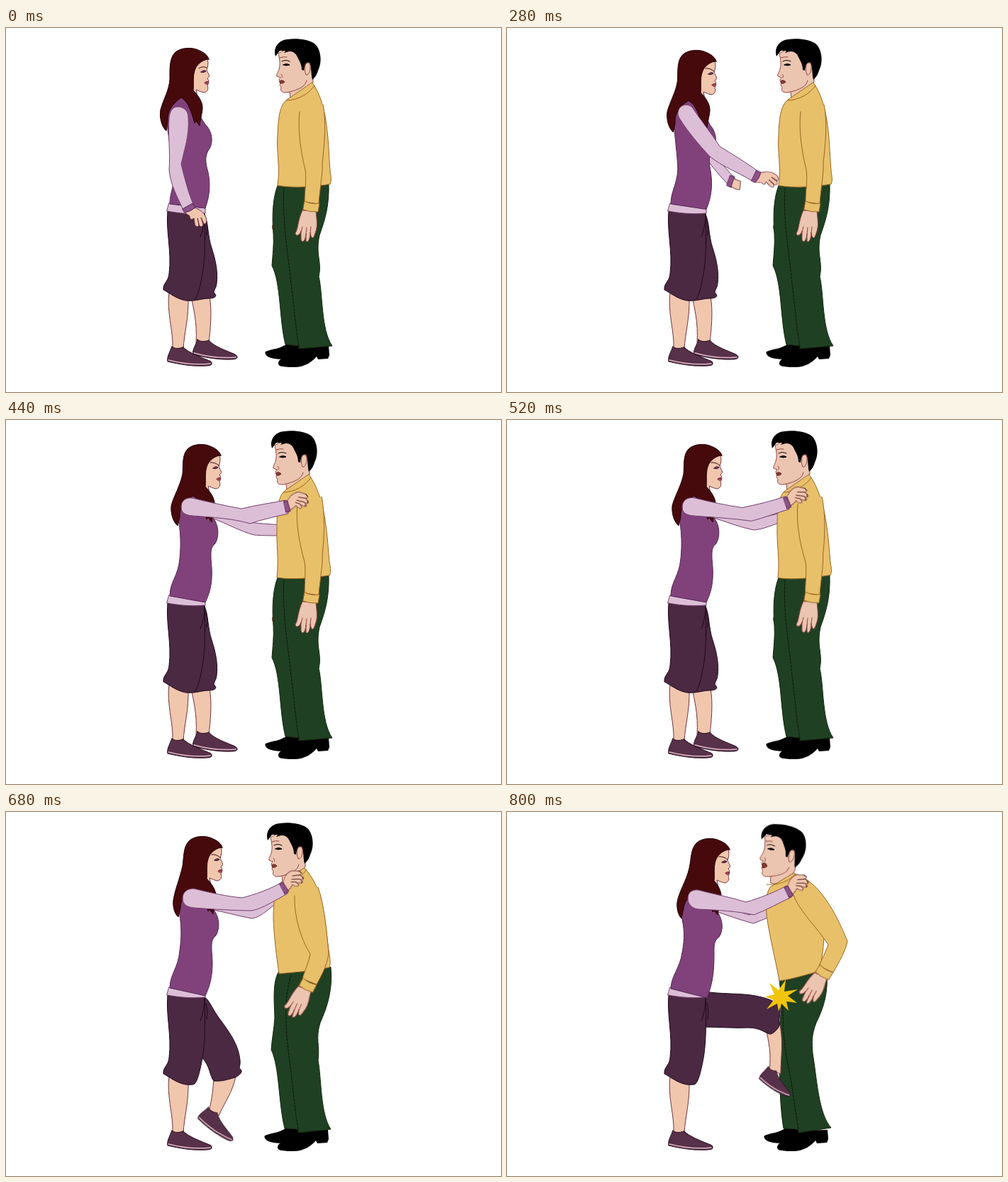
Animation of 698 by 513 pixels, one loop 1200 ms. Source, as an HTML page without scripts:

```html
<!DOCTYPE html>
<html lang="en">
<head>
<meta charset="utf-8">
<title>Knee strike</title>
<style>
html, body { margin: 0; width: 100%; height: 100%; overflow: hidden; background: #fff; }
svg { display: block; width: 698px; height: 513px; }
path { stroke-width: 1; stroke-linejoin: round; stroke-linecap: round; }

.skin { fill: #f0c6ad; stroke: #6e3440; }
.sleeve { fill: #dcbfd7; stroke: #74406c; }
.top { fill: #81427c; stroke: #552352; }
.cuff { fill: #8d5288; stroke: #552352; }
.shorts { fill: #4b2942; stroke: #1e0a1a; }
.hair { fill: #460a0c; stroke: #240204; }
.shoe { fill: #573049; stroke: #2a1222; }
.sole { fill: none; stroke: #dcb4c4; stroke-width: 1.5; }
.man-skin { fill: #ecc5b1; stroke: #8e4640; }
.shirt { fill: #e8c069; stroke: #9a6424; }
.pants { fill: #204023; stroke: #14280f; }
.black { fill: #000; }
.line { fill: none; }

/* One drawing step every 40 ms; each segment sets its own count. */
.k { animation: 1.2s steps(2) infinite; }
#w-head { animation-name: w-head; }
#hair { animation-name: hair; }
#brow { animation-name: brow; }
#torso { animation-name: torso; }
#arm { animation-name: arm; }
#hand-down { animation-name: hand-down; }
#hand-grip { animation-name: hand-grip; }
#far-arm { animation-name: far-arm; }
#far-hand { animation-name: far-hand; }
#thigh { animation-name: thigh; }
#shin { animation-name: shin; }
#foot { animation-name: foot; }
.m-head { animation-name: m-head; transform-origin: 408px 80px; }
#mouth { animation-name: mouth; transform-box: fill-box; transform-origin: center; }
#shirt { animation-name: shirt; }
#m-arm { animation-name: m-arm; }
#m-hand { animation-name: m-hand; }
#pants { animation-name: pants; }
#crease { animation-name: crease; }
#m-shoes { animation-name: m-shoes; }
#m-far { animation-name: m-far; }
#star { animation-name: star; }

@keyframes w-head {
  0% { transform: translate(0, 0); animation-timing-function: steps(5); }
  16.66% { transform: translate(1px, 0); animation-timing-function: steps(4); }
  30%, 50% { transform: translate(17px, 6px); }
  56.66% { transform: translate(19px, 6px); animation-timing-function: steps(3); }
  66.66%, to { transform: translate(28px, 9px); }
}
@keyframes hair {
  0%, 16.66% { d: path("M286 44 C279 44 269 50 266 60 C263 70 265 80 264 88 C270 94 278 104 277 114 C276 124 274 128 273 138 L268 131 L266 134 C263 124 258 104 247 98 C236 106 227 116 228 131 L226 145 C219 139 216 125 218 115 C222 100 230 88 231 72 C231 60 230 43 238 35 C246 27 263 27 271 31 C279 34 285 39 286 44 Z"); animation-timing-function: steps(4); }
  30%, 50% { d: path("M286 44 C279 44 269 50 266 60 C263 70 265 80 264 88 C270 94 278 104 277 114 C276 124 274 128 273 138 L268 131 L266 134 C263 124 258 106 247 101 C236 106 227 116 228 131 L225 143 C218 137 215 125 216 115 C219 102 229 86 232 70 C233 58 231 43 239 35 C247 27 263 27 271 31 C279 34 285 39 286 44 Z"); }
  56.66% { d: path("M286 44 C279 44 269 50 266 60 C263 70 265 80 264 88 C270 94 278 104 277 114 C276 124 274 128 273 138 L268 131 L266 134 C263 124 258 108 247 102 C236 106 227 116 227 129 L224 142 C218 137 216 126 217 118 C219 104 226 88 230 70 C232 56 231 43 239 35 C247 27 263 27 271 31 C279 34 285 39 286 44 Z"); animation-timing-function: steps(3); }
  66.66%, to { d: path("M286 44 C279 44 269 50 266 60 C263 70 265 80 264 88 C270 94 275 104 274 112 C273 122 270 126 269 136 L264 130 L262 132 C259 122 256 108 246 104 C234 104 222 114 221 127 L218 141 C213 136 211 126 212 118 C214 104 225 88 229 70 C232 56 231 43 239 35 C247 27 263 27 271 31 C279 34 285 39 286 44 Z"); }
}
@keyframes brow {
  0% { d: path("M272 57 Q277 53 283 56"); animation-timing-function: steps(5); }
  16.66%, to { d: path("M271 54 Q277 53 283 58"); }
}
@keyframes torso {
  0%, 16.66% { d: path("M247 98 C262 104 272 122 281 136 C290 144 293 160 287 170 C281 178 281 186 283 196 C289 215 288 235 281 254 L231 248 C231 228 243 212 236 185 C231 165 227 145 227 125 C229 112 238 102 247 98 Z"); animation-timing-function: steps(4); }
  30%, 50% { d: path("M263 103 C278 108 287 124 292 138 C300 148 301 164 295 174 C288 180 289 186 289 196 C291 215 292 235 281 257 L231 248 C231 228 243 220 245 195 C247 175 246 160 244 145 C238 122 250 106 263 103 Z"); }
  56.66% { d: path("M264 103 C279 108 288 124 293 138 C301 148 302 164 296 174 C289 180 290 186 290 196 C292 215 292 236 281 259 L231 248 C231 229 243 220 245 195 C248 175 247 160 245 145 C240 122 251 106 264 103 Z"); animation-timing-function: steps(3); }
  66.66%, to { d: path("M268 106 C283 112 291 126 296 140 C304 150 306 166 299 176 C291 182 292 190 292 200 C292 220 291 240 282 262 L231 249 C231 232 244 220 247 198 C251 178 250 163 246 147 C246 128 254 112 268 106 Z"); }
}
@keyframes arm {
  0% { d: path("M242 111 C250 111 257 116 257 126 C259 152 251 172 247 192 C252 212 257 232 264 248 L250 257 C242 238 232 222 230 200 C232 175 228 150 230 127 C231 117 235 111 242 111 Z"); animation-timing-function: steps(5); }
  16.66% { d: path("M243 111 C251 111 258 116 258 126 C260 152 254 172 251 192 C257 212 262 232 271 248 L258 257 C248 238 236 222 234 200 C237 175 232 150 231 127 C232 117 236 111 243 111 Z"); }
  23.33% { d: path("M244 112 C250 106 258 108 262 113 C276 134 288 148 300 167 C318 178 338 190 354 202 L345 215 C325 203 303 195 286 181 C271 165 255 146 245 130 C240 124 240 117 244 112 Z"); }
  30% { d: path("M248 124 C248 115 254 111 263 112 C287 120 310 128 326 143 C345 140 368 145 391 147 L391 161 C370 163 350 163 332 164 C310 160 288 142 263 137 C253 136 248 132 248 124 Z"); }
  36.66% { d: path("M247 123 C247 114 253 109 263 110 C287 116 310 121 332 125 C352 120 374 117 395 113 L398 132 C380 136 362 140 344 146 C322 139 290 137 263 135 C253 134 247 131 247 123 Z"); animation-timing-function: steps(4); }
  50% { d: path("M247 123 C247 114 253 109 263 109 C287 115 310 120 332 122 C352 118 374 112 391 102 L398 119 C380 126 362 136 345 139 C322 139 290 137 263 135 C253 134 247 131 247 123 Z"); }
  56.66% { d: path("M249 122 C249 113 255 108 265 108 C289 114 312 119 333 121 C352 116 372 109 389 99 L397 115 C380 124 362 136 347 139 C324 139 292 137 265 135 C255 134 249 130 249 122 Z"); animation-timing-function: steps(3); }
  66.66%, to { d: path("M255 122 C255 113 261 109 270 110 C292 116 316 120 337 127 C357 121 378 113 394 104 L401 120 C384 128 366 138 348 145 C326 140 296 138 270 137 C261 136 255 130 255 122 Z"); }
}
@keyframes hand-down {
  0% { transform: translate(257px, 253px); opacity: 1; animation-timing-function: steps(5); }
  16.66% { transform: translate(264px, 253px); }
  23.33% { transform: translate(350px, 209px) rotate(-35deg); opacity: 1; animation-timing-function: step-end; }
  26.66%, to { transform: translate(371px, 181px) rotate(-50deg); opacity: 0; }
}
@keyframes hand-grip {
  0% { transform: translate(371px, 181px) rotate(15deg); opacity: 0; animation-timing-function: step-end; }
  26.66% { transform: translate(371px, 181px) rotate(15deg); opacity: 1; animation-timing-function: step-end; }
  30% { transform: translate(392px, 154px) rotate(0deg); }
  36.66% { transform: translate(397px, 122px) rotate(-8deg); animation-timing-function: steps(4); }
  50% { transform: translate(395px, 111px) rotate(-22deg); }
  56.66% { transform: translate(393px, 107px) rotate(-24deg); animation-timing-function: steps(3); }
  66.66%, to { transform: translate(398px, 112px) rotate(-22deg); opacity: 1; }
}
@keyframes far-arm {
  0%, 16.66% { d: path("M262 125 C265 145 265 160 265 180 C268 200 270 215 272 235 L260 238 C255 220 252 205 250 185 C250 165 250 145 250 130 Z"); animation-timing-function: steps(4); }
  30% { d: path("M285 140 C297 150 308 160 318 174 C336 184 358 190 378 198 L372 212 C352 204 334 196 315 187 C306 176 300 166 290 158 Z"); }
  36.66% { d: path("M285 136 C300 137 320 140 342 144 C358 146 374 147 392 148 L392 163 C376 163 362 163 350 162 C330 157 312 146 290 138 Z"); animation-timing-function: steps(4); }
  50% { d: path("M285 130 C300 132 320 134 342 134 C358 130 374 122 392 110 L392 122 C376 130 362 146 345 148 C325 145 305 140 290 137 Z"); }
  56.66% { d: path("M286 130 C300 132 320 134 342 136 C358 130 374 122 392 112 L392 122 C376 130 362 148 347 150 C325 146 305 140 291 138 Z"); animation-timing-function: steps(3); }
  66.66%, to { d: path("M287 130 C305 134 322 139 342 145 C358 138 376 130 395 122 L395 138 C380 143 362 152 347 157 C328 152 310 145 294 140 Z"); }
}
@keyframes far-hand {
  0%, 16.66% { transform: translate(258px, 230px) rotate(15deg); animation-timing-function: steps(4); }
  30% { transform: translate(375px, 205px) rotate(15deg); }
  36.66%, to { transform: translate(394px, 155px) rotate(0deg); }
}
@keyframes thigh {
  0%, 50% { d: path("M279 260 C286 275 284 292 290 310 C296 328 299 345 297 360 C297 366 291 372 294 374 C298 377 295 381 288 381 C278 381 270 384 264 384 C268 372 272 355 272 340 Z"); }
  56.66% { d: path("M279 260 C286 264 290 275 298 287 C310 304 328 325 330 350 C331 358 327 361 331 363 C335 366 328 373 320 375 C312 377 305 380 293 379 C287 372 288 358 277 347 Z"); animation-timing-function: steps(3); }
  66.66%, to { d: path("M279 253 C300 257 330 255 350 259 C366 262 378 266 384 273 C387 280 383 290 384 298 C386 302 376 313 371 313 C364 312 358 304 340 304 C320 305 300 303 279 303 Z"); }
}
@keyframes shin {
  0%, 50% { d: path("M261 378 C264 394 270 415 268 444 L286 444 C288 425 291 400 287 378 Z"); }
  56.66% { d: path("M293 374 C292 390 291 402 286 422 L300 428 C310 406 320 394 324 372 Z"); animation-timing-function: steps(3); }
  66.66%, to { d: path("M365 304 C369 325 373 340 370 364 L386 369 C386 345 391 320 383 292 Z"); }
}
@keyframes foot {
  0%, 50% { transform: translate(264px, 459px) rotate(0deg) scale(1, 1); }
  56.66% { transform: translate(271px, 431px) rotate(28deg) scale(.93, 1); animation-timing-function: steps(3); }
  66.66%, to { transform: translate(356px, 375px) rotate(24deg) scale(.8, 1); }
}
@keyframes m-head {
  0%, 30% { transform: translate(0, 0) rotate(0deg); }
  36.66% { transform: translate(-5px, 0) rotate(0deg); animation-timing-function: steps(4); }
  50% { transform: translate(-7px, 0) rotate(0deg); }
  56.66% { transform: translate(-11px, 0) rotate(0deg); animation-timing-function: steps(3); }
  66.66%, to { transform: translate(-27px, 2px) rotate(8deg); }
}
@keyframes mouth {
  0%, 56.66% { transform: scaleY(1); animation-timing-function: steps(3); }
  66.66%, to { transform: scaleY(1.4); }
}
@keyframes shirt {
  0%, 30% { d: path("M399 99 C386 106 384 125 383 150 C381 175 387 195 383 222 C405 226 435 224 457 220 C460 214 457 205 457 200 C454 170 456 110 432 77 Z"); }
  36.66% { d: path("M394 99 C384 106 382 125 382 150 C381 175 385 195 382 222 C405 226 435 222 456 219 C459 214 457 205 456 200 C453 170 452 110 427 77 Z"); animation-timing-function: steps(4); }
  50% { d: path("M391 100 C382 106 380 125 380 150 C379 175 385 195 382 223 C405 226 435 222 456 218 C459 214 456 205 456 200 C453 170 450 110 425 77 Z"); }
  56.66% { d: path("M387 100 C380 106 377 125 377 150 C378 175 381 200 385 228 C405 226 435 224 456 219 C458 214 457 205 455 195 C450 160 450 110 421 79 Z"); animation-timing-function: steps(3); }
  66.66%, to { d: path("M371 106 C364 118 365 128 366 145 C370 175 378 205 384 238 C400 236 420 230 441 224 C444 205 447 190 447 170 C440 150 430 105 405 86 Z"); }
}
@keyframes m-arm {
  0%, 30% { d: path("M414 118 C411 145 416 175 422 200 C424 215 421 230 421 245 L441 248 C442 230 447 205 446 190 C449 165 452 130 447 108"); }
  36.66% { d: path("M411 118 C408 145 414 175 421 200 C423 215 421 230 421 244 L441 247 C442 230 447 205 446 190 C449 165 450 130 445 108"); animation-timing-function: steps(4); }
  50% { d: path("M409 118 C407 145 412 175 421 200 C423 215 420 230 420 244 L441 246 C442 230 446 205 445 190 C448 165 449 130 443 108"); }
  56.66% { d: path("M407 118 C406 145 415 178 429 200 C427 212 421 224 418 235 L438 243 C445 230 452 218 455 200 C453 175 449 130 440 106"); animation-timing-function: steps(3); }
  66.66%, to { d: path("M403 115 C412 140 437 162 453 187 C449 198 444 207 440 217 L460 226 C468 212 478 195 480 182 C470 158 446 100 408 88"); }
}
@keyframes m-hand {
  0%, 30% { transform: translate(431px, 246px) rotate(0deg); }
  36.66% { transform: translate(431px, 245px) rotate(0deg); animation-timing-function: steps(4); }
  50% { transform: translate(431px, 244px) rotate(0deg); }
  56.66% { transform: translate(428px, 239px) rotate(18deg); animation-timing-function: steps(3); }
  66.66%, to { transform: translate(450px, 221px) rotate(22deg); }
}
@keyframes pants {
  0%, 50% { d: path("M383 222 C376 240 375 265 377 290 C378 305 376 320 375 335 C388 360 385 410 394 446 L413 448 L413 452 L460 448 C444 425 447 375 441 350 C446 330 436 320 442 292 C450 270 456 250 455 219 Z"); }
  56.66% { d: path("M384 226 C376 240 378 265 379 290 C378 305 375 320 374 335 C386 360 384 410 393 446 L412 447 L412 452 L458 447 C443 425 445 375 440 350 C443 330 436 320 443 297 C453 275 461 250 458 219 Z"); animation-timing-function: steps(3); }
  66.66%, to { d: path("M384 236 C385 245 387 262 386 285 C384 305 382 330 383 345 C385 370 384 410 390 446 L411 447 L411 452 L457 445 C439 425 437 375 431 340 C430 325 429 315 436 297 C447 275 453 255 451 224 Z"); }
}
@keyframes crease {
  0%, 50% { d: path("M392 226 C389 270 398 320 402 360 C406 390 408 420 413 448"); }
  56.66% { d: path("M402 230 C389 270 396 320 401 360 C405 390 407 420 412 447"); animation-timing-function: steps(3); }
  66.66%, to { d: path("M390 240 C388 270 388 320 397 360 C403 390 406 420 411 447"); }
}
@keyframes m-shoes {
  0%, 50% { transform: translate(0, 0); }
  56.66% { transform: translate(-1px, 0); animation-timing-function: steps(3); }
  66.66%, to { transform: translate(-3px, 0); }
}
@keyframes m-far {
  0%, 50% { transform: translate(0, 0); }
  56.66%, to { transform: translate(14px, 0); }
}
@keyframes star {
  0% { opacity: 0; animation-timing-function: step-end; }
  66.66%, to { opacity: 1; }
}
</style>
</head>
<body>
<svg viewBox="0 0 698 513">
  <defs>
    <g id="shoe">
      <path class="shoe" d="M6 -20 C11 -16 17 -17 22 -19 C29 -10 48 -4 59 1 C64 4 63 8 55 8 C35 9 15 5 0 1 C-2 -6 4 -12 6 -20 Z"/>
      <path class="sole" d="M1 -1 C15 3 38 7 60 5"/>
    </g>
  </defs>

  <path id="far-arm" class="k sleeve"/>
  <g id="far-hand" class="k">
    <path class="skin" d="M-3 -6 C3 -7 8 -4 12 -5 L14 7 C8 9 2 6 -4 4 Z"/>
    <path class="cuff" d="M-4 -9 L2 -9 L1 7 L-5 6 Z"/>
  </g>

  <g id="man">
    <g id="m-shoes" class="k">
      <path class="black" d="M366 456 C376 452 388 452 396 445 L418 448 L400 462 C392 469 376 467 369 463 Q364 459 366 456 Z"/>
      <path class="black" d="M384 473 C384 464 404 458 413 449 L455 448 L456 461 L454 466 L440 467 L438 463 C432 470 422 478 406 478 C396 478 384 478 384 473 Z"/>
    </g>
    <path id="m-far" class="k man-skin" d="M379 275 C374 277 374 285 379 286 Z"/>
    <path id="pants" class="k pants"/>
    <path id="crease" class="k line" stroke="#081408" stroke-dasharray="3 2"/>
    <g class="k m-head">
      <path class="man-skin" d="M384 36 C386 44 387 52 385 58 C384 62 381 65 382 68 L387 70 C384 73 385 75 387 77 C385 80 387 82 388 84 C386 89 390 91 394 91 L400 90 L401 99 C416 102 428 90 433 76 L432 40 L408 24 Z"/>
      <path class="line" stroke="#8e4640" d="M400 90 C412 87 422 83 424 74 M388 65 Q391 67 389 70 M386 42 Q392 40 396 41"/>
      <path class="black" d="M380 40 C376 28 384 17 397 16 C412 14 428 17 435 22 C443 28 447 46 440 60 C438 67 435 70 432 73 C430 66 431 55 428 49 C424 47 421 51 420 60 L417 59 C417 50 413 46 410 39 C407 34 404 33 399 33 L392 35 L394 32 L386 32 Q383 36 380 40 Z"/>
      <path class="man-skin" d="M422 52 C424 47 430 48 429 56 C429 62 426 67 423 66 C421 62 421 56 422 52 Z"/>
      <path d="M389 47 Q394 44 400 47" fill="none" stroke="#000" stroke-width="2"/>
      <path d="M391 52 Q395 49 400 52 Q395 54 391 52 Z" fill="#321015" stroke="#000"/>
      <path id="mouth" class="k" d="M386 75 Q389 72 393 76 Q390 79 387 78 Z" fill="#8c4038" stroke="#5a1c18"/>
    </g>
    <path id="shirt" class="k shirt"/>
    <path class="k m-head line" stroke="#9a6424" d="M396 102 C412 102 428 92 435 81"/>
    <path id="m-arm" class="k shirt"/>
    <g id="m-hand" class="k">
      <path class="man-skin" d="M-13 11 L6 12 C7 24 9 34 5 43 C3 50 1 52 -1 47 L-2 42 C-2 52 -6 58 -8 54 L-8 44 C-9 56 -14 57 -15 52 L-15 40 C-17 47 -23 48 -23 43 C-19 38 -20 26 -13 11 Z"/>
      <path class="line" stroke="#8e4640" d="M-2 43 L-1 34 M-8 45 L-7 35 M-15 42 L-13 34"/>
      <path class="shirt" d="M-10 -2 Q0 3 11 1 L9 13 Q-2 14 -12 10 Z"/>
    </g>
  </g>

  <g id="woman">
    <path id="shin" class="k skin"/>
    <use id="foot" class="k" href="#shoe"/>
    <path id="thigh" class="k shorts"/>
    <path class="skin" d="M230 372 C226 400 236 425 235 452 L250 453 C251 430 258 410 257 378 Z"/>
    <use href="#shoe" transform="translate(228 469) rotate(-1)"/>
    <path class="shorts" d="M228 258 L280 260 C281 290 281 325 277 347 C274 362 270 383 264 384 C246 387 232 374 222 369 C221 359 229 358 230 346 C234 315 225 285 228 258 Z"/>
    <path class="line" stroke="#1e0a1a" d="M280 263 Q280 280 274 294 M282 270 Q285 278 283 292"/>
    <path class="sleeve" d="M230 247 L281 254 L281 261 C262 263 244 261 227 258 Z"/>
    <path id="torso" class="k top"/>
    <g id="w-head" class="k">
      <path class="skin" d="M283 40 C286 48 285 54 283 59 C284 63 288 67 286 69 L284 71 Q287 74 285 76 Q286 79 284 81 C286 86 284 90 279 91 C274 90 271 88 268 87 L270 97 L256 100 L256 46 Z"/>
      <path id="hair" class="k hair"/>
      <path id="brow" class="k line" stroke="#3a0a0c"/>
      <path d="M275 62 Q279 58 282 61 Q278 64 275 62 Z" fill="#6b4a7c" stroke="#3a0a20"/>
      <path d="M280 77 Q283 74 286 76 Q285 80 282 79 Z" fill="#a84458" stroke="#7a2438"/>
    </g>
    <path id="arm" class="k sleeve"/>
    <g id="hand-down" class="k">
      <path class="skin" d="M-5 6 L8 0 C15 2 21 6 24 12 C27 18 26 24 22 23 L18 14 L21 24 C20 28 16 28 15 23 L13 15 L15 25 C13 29 9 26 9 22 L8 15 L5 17 C1 16 4 11 -1 10 Z"/>
      <path class="cuff" d="M-8 2 L6 -6 L10 0 Q3 6 -5 7 Z"/>
    </g>
    <g id="hand-grip" class="k">
      <path class="skin" d="M0 -7 C5 -14 12 -19 19 -18 L27 -14 C31 -11 31 -8 27 -8 L30 -3 C30 0 27 0 24 -3 L27 2 C26 5 22 3 18 -1 L20 4 C17 7 13 3 12 0 C8 4 3 5 0 6 Z"/>
      <path class="line" stroke="#3a0a14" d="M28 -14 L30 -10 M29 -4 L29 -1 M25 1 L25 3 M27 -8 L17 -11 M24 -3 L14 -7 M18 -1 L12 -4"/>
      <path class="cuff" d="M-4 -8 L1 -8 L3 7 L-3 8 Z"/>
    </g>
  </g>

  <path id="star" class="k" fill="#f2c40c" d="M393 236 L391 253 L410 250 L396 259 L409 269 L394 267 L397 280 L387 270 L383 281 L381 270 L366 278 L376 265 L364 260 L377 257 L370 241 L383 251 Z"/>
</svg>
</body>
</html>
```
